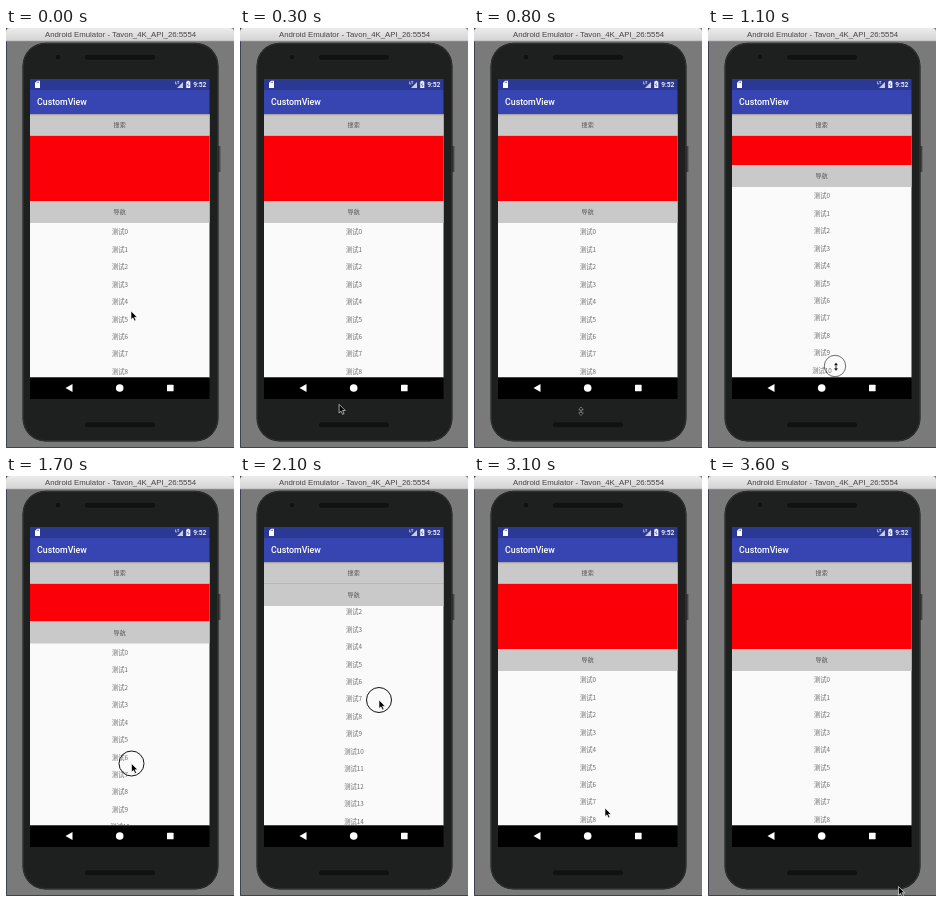
Recreate the animation shown at these times as an HTML page. Size 228x420 px, loop 3.7 s.

```html
<!DOCTYPE html>
<html lang="zh">
<head>
<meta charset="utf-8">
<title>CustomView</title>
<style>
  html, body { margin: 0; width: 100%; height: 100%; overflow: hidden; background: #7a7a7a; }
  svg { display: block; width: 228px; height: 420px; }
  .cjk { font: 6.3px "Noto Sans CJK SC", "Noto Sans CJK", sans-serif; fill: #6b6b6b; text-anchor: middle; }
  .head { font-size: 6.1px; fill: #505050; }
  .title { font: 7.8px "Liberation Sans", Arial, sans-serif; fill: #454545; }
  .app { font: 500 8.8px Roboto, sans-serif; fill: #fff; }
  .clock { font: 500 6.7px Roboto, sans-serif; fill: #fff; }
</style>
</head>
<body>
<svg viewBox="0 0 228 420">
  <defs>
    <linearGradient id="bar" x2="0" y2="1">
      <stop stop-color="#ececec"/><stop offset="1" stop-color="#d3d3d3"/>
    </linearGradient>
    <linearGradient id="shade" x2="0" y2="1">
      <stop stop-color="#000" stop-opacity=".3"/><stop offset="1" stop-color="#000" stop-opacity="0"/>
    </linearGradient>
    <clipPath id="content"><rect x="24" y="86" width="179.5" height="263.5"/></clipPath>
  </defs>

  <!-- window -->
  <rect width="228" height="420" fill="#7a7a7a"/>
  <path d="M.5 0V419.5H228" fill="none" stroke="#3d4350"/>
  <path d="M0 13V4Q0 0 4 0H224Q228 0 228 4V13Z" fill="url(#bar)"/>
  <path d="M0 13H228" stroke="#a8a8a8" stroke-width=".6"/>
  <text class="title" x="39" y="8.7">Android Emulator - Tavon_4K_API_26:5554</text>

  <!-- phone -->
  <path d="M213.2 118V144" stroke="#444" stroke-width="2.4"/>
  <rect x="16.5" y="14.8" width="196" height="398.7" rx="23" fill="#151616"/>
  <rect x="17.3" y="15.6" width="194.4" height="397.1" rx="22.2" fill="#1e1f1f" stroke="#323333"/>
  <circle cx="52" cy="29" r="3" fill="#101114" stroke="#303132" stroke-width=".6"/>
  <g fill="#111" stroke="#292a2a" stroke-width=".6">
    <rect x="78.5" y="26.3" width="71" height="6" rx="2.5"/>
    <rect x="78.5" y="393.8" width="71" height="6" rx="2.5"/>
  </g>

  <!-- list and headers -->
  <g clip-path="url(#content)">
    <rect x="24" y="86" width="180" height="264" fill="#fafafa"/>
    <g id="list"></g>
    <rect id="red" x="24" y="107.5" width="180" fill="#fc0007"/>
    <g id="nav">
      <rect x="24" y="173" width="180" height="22" fill="#c9c9c9"/>
      <text class="cjk head" x="113.7" y="186.4">导航</text>
    </g>
    <rect x="24" y="86" width="180" height="21.5" fill="#c9c9c9"/>
    <path d="M24 107.5H204" stroke="#b9b9b9" stroke-width=".4"/>
    <text class="cjk head" x="113.7" y="99.2">搜索</text>
    <rect x="24" y="85.5" width="180" height="2.5" fill="url(#shade)"/>
  </g>

  <!-- app bars -->
  <rect x="24" y="51" width="179.5" height="11" fill="#2b3894"/>
  <rect x="24" y="62" width="179.5" height="24" fill="#3745b2"/>
  <text class="app" x="31" y="77.2">CustomView</text>
  <path d="M29 54.8L31 52.8H34V60H29Z" fill="#fff"/>
  <path d="M31.2 53.6V55M32.5 53.6V55" stroke="#2b3894" stroke-width=".6"/>
  <path d="M177 54V60H171Z" fill="#fff" opacity=".75"/>
  <path d="M169.6 53.4V56H171M171.3 53.6H173.2M172.2 53.6V56" fill="none" stroke="#fff" stroke-width=".6"/>
  <path d="M180.3 53.5H181.4V52.7H183.2V53.5H184.3V60H180.3Z" fill="#fff"/>
  <path d="M182.7 54.5L181.4 57H183.1L182 59" fill="none" stroke="#2b3894" stroke-width=".6"/>
  <text class="clock" x="187.2" y="59.2">9:52</text>

  <!-- system buttons -->
  <rect x="24" y="349.5" width="179.5" height="21.5" fill="#000"/>
  <path d="M66.5 356V364L59.5 360Z" fill="#fff"/>
  <circle cx="113.7" cy="360" r="3.8" fill="#fff"/>
  <rect x="161" y="356.7" width="6.6" height="6.6" rx=".6" fill="#fff"/>

  <!-- pointer -->
  <g id="pointer">
    <circle id="ring" fill="none" stroke="#111"/>
    <path id="arrow" d="M0 0V8.6L2 6.8L3.5 10L5 9.3L3.5 6.2H6.2Z" fill="#000" stroke="#fff" stroke-width=".6"/>
    <path id="resize" d="M1-3.5L3.2-.8H1.6V2.3H3.2L1 5L-1.2 2.3H.4V-.8H-1.2Z" fill="#000" stroke="#fff" stroke-width=".4"/>
  </g>
</svg>
<script>
  const LOOP = 3700, STEP = 100, PITCH = 17.45, FOLD = 65;

  // Turning points of the hand: time, x, y
  const path = [
    [0, 125, 283], [500, 85, 427], [1100, 127, 338], [1700, 125.5, 287.5],
    [2100, 139, 224], [2700, 134, 256], [3100, 131, 332], [3600, 190.5, 410.5]
  ];
  // Turning points of the list: time, distance scrolled
  const scrolls = [[800, 0], [1100, 36], [1700, 27.5], [2100, 103], [2700, 76], [3100, 0]];

  const $ = id => document.getElementById(id);
  const set = (id, attrs) => {
    for (const name in attrs) $(id).setAttribute(name, attrs[name]);
  };
  const shift = (x, y) => ({ transform: `translate(${x} ${y})` });
  const ramp = (t, from, to) => Math.min(1, Math.max(0, (t - from) / (to - from)));
  const smooth = p => p * p * (3 - 2 * p);

  // Eased value of one column at time t, held before the first and after the last point
  const along = (points, column, t) => points.reduce((value, point, i) =>
    i ? value + (point[column] - points[i - 1][column]) * smooth(ramp(t, points[i - 1][0], point[0]))
      : point[column], 0);

  for (let i = 0; i < 18; i++) {
    const row = document.createElementNS("http://www.w3.org/2000/svg", "text");
    row.setAttribute("class", "cjk");
    row.setAttribute("x", 114);
    row.setAttribute("y", 206.3 + i * PITCH);
    row.textContent = "测试" + i;
    $("list").append(row);
  }

  function draw(t) {
    const scroll = along(scrolls, 1, t);
    const fold = Math.min(scroll, FOLD);
    const tap = 0.4 * Math.max(0, 1 - Math.abs(t - 500) / 200);
    const hold = ramp(t, 800, 1300) * (1 - ramp(t, 2900, 3100));
    const press = Math.max(tap, hold);
    // The window edge leaves its resize cursor behind until the drag is under way
    const resizing = t >= 500 && t < 1300;

    set("list", shift(0, -scroll));
    set("nav", shift(0, -fold));
    set("red", { height: 65.5 - fold });
    set("pointer", shift(along(path, 1, t), along(path, 2, t)));
    set("ring", { r: 8 + 4.5 * press, opacity: press });
    set("arrow", { opacity: resizing ? 0 : 1 });
    set("resize", { opacity: resizing ? 1 : 0 });
  }

  const start = performance.now();
  function tick() {
    const t = (performance.now() - start) % LOOP;
    draw(Math.floor(t / STEP) * STEP);
    requestAnimationFrame(tick);
  }
  draw(0);
  requestAnimationFrame(tick);
</script>
</body>
</html>
```
